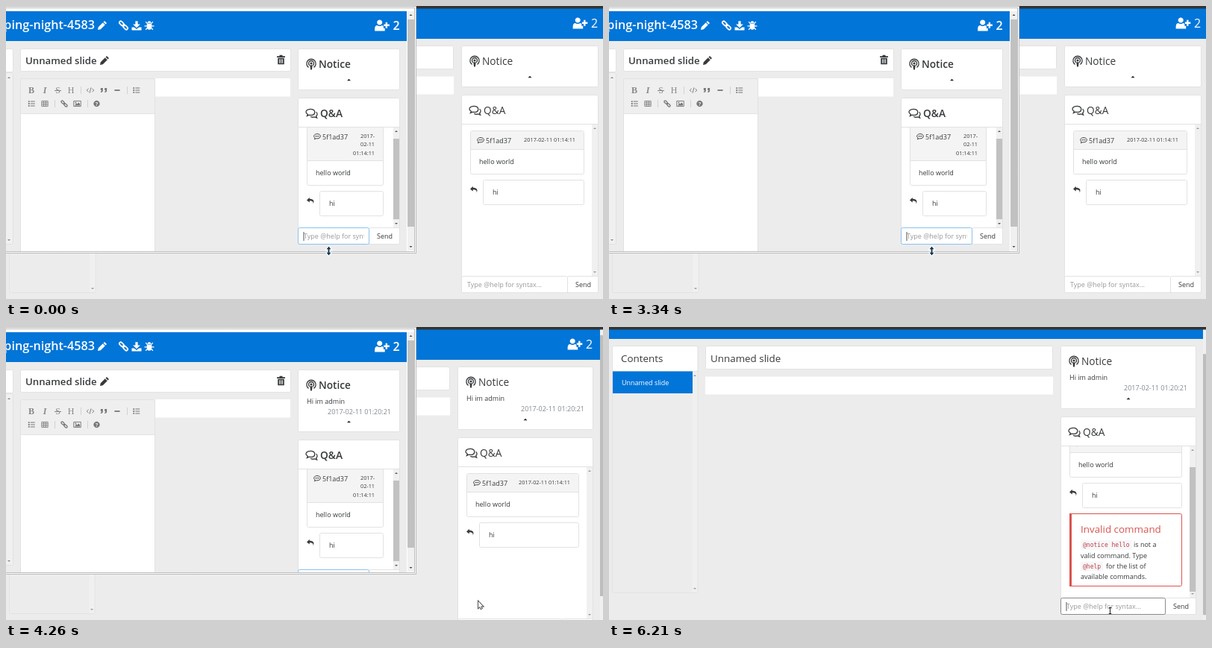
Animation of 800 by 393 pixels, one loop 6.61 s. Source, as an HTML page with a canvas:

```html
<!DOCTYPE html>
<html lang="en">
<head>
<meta charset="utf-8">
<title>Slide chat commands</title>
<style>
  html, body { margin: 0; width: 100%; height: 100%; overflow: hidden; background: #ececec; }
  canvas { display: block; }
</style>
</head>
<body>
<canvas id="stage" width="800" height="393"></canvas>
<script>
const ctx = document.getElementById('stage').getContext('2d');
const LOOP = 6610;
const BLUE = '#0275d8', INK = '#373a3c', GREY = '#ececec', LINE = '#e2e2e2', RED = '#d9534f';
const SANS = '"Open Sans", "Noto Sans", sans-serif';
const MONO = '"DejaVu Sans Mono", monospace';
const USER = '5f1ad37';

// Icons live in a box from -8 to 8: f is filled, s is stroked with width w.
const ICONS = {
  pencil: { f: 'M-8 8l1-5 8-8 4 4-8 8zM2-6l2-2 4 4-2 2z' },
  link: { s: 'M-3-6.2L-.2-3.4A2.2 2.2 0 0 1-3.4-.2L-6.2-3A2.2 2.2 0 0 1-3-6.2zM3 6.2L.2 3.4A2.2 2.2 0 0 1 3.4 .2L6.2 3A2.2 2.2 0 0 1 3 6.2zM-1.5-1.5L1.5 1.5', w: 2.2 },
  download: { f: 'M-2-7h4v5h4L0 4l-6-6h4zM-8 3h4l4 3 4-3h4v5h-16z' },
  bug: { f: 'M-3-4a3 3 0 0 1 6 0zM-4-3h8v5a4 5 0 0 1-8 0z', s: 'M-8 1h16M-6-6l3 3M6-6l-3 3M-6 7l3-3M6 7l-3-3', w: 1.6 },
  userPlus: { f: 'M-3-.5a3.8 3.8 0 1 1 .01 0zM-10 8v-3q0-5 3.5-5 3.5 2 7 0 1.5 0 2 1.5v2.5h2v4zM3-1.5h2.5v-3h2.5v3h3v2.5h-3v3h-2.5v-3h-2.5z' },
  trash: { f: 'M-7-6h14v2h-14zM-2.5-8h5v2h-5zM-5.5-3h11v11h-11zM-3.2-1v7h1.2v-7zM-.6-1v7h1.2v-7zM2-1v7h1.2v-7z' },
  podcast: { s: 'M-4 5a7 7 0 1 1 8 0M-2.5 2a4 4 0 1 1 5 0', f: 'M0-3a1.8 1.8 0 1 1-.01 0zM-2 1.5h4l-1 7h-2z', w: 1.5 },
  comments: { s: 'M-2-6c4 0 6 2 6 4.3s-2 4.3-6 4.3q-1 0-2-.3l-3 1.3 1-2.3c-5-3-2-7.3 4-7.3zM6-2c3 3 1 5 0 6l1 2.5-3-1.3q-4 1-6-.6', w: 1.4 },
  comment: { s: 'M0-5.5c4.5 0 7 2.3 7 5s-2.5 5-7 5q-1 0-2-.2l-4 1.7 1.5-2.7c-5-3.3-2-8.8 4.5-8.8z', f: 'M-4-1.5h2v2h-2zM-1-1.5h2v2h-2zM2-1.5h2v2h-2z', w: 1.5 },
  reply: { f: 'M-8-1l6-6v3.5c8 0 11 4 8 10.5 0-5-2-6.5-8-6.5v3.5z' },
  code: { s: 'M-4-4l-4 4 4 4M4-4l4 4-4 4M1.5-6l-3 12', w: 1.6 },
  quote: { f: 'M-7-5h5v6q0 4-5 4v-2q2 0 2-3h-2zM2-5h5v6q0 4-5 4v-2q2 0 2-3h-2z' },
  minus: { f: 'M-6-1.5h12v3h-12z' },
  list: { s: 'M-2-5h10M-2 0h10M-2 5h10', f: 'M-7-6.5h3v3h-3zM-7-1.5h3v3h-3zM-7 3.5h3v3h-3z', w: 1.8 },
  table: { s: 'M-7-6h14v12h-14zM-7-2h14M-7 2h14M-2.3-6v12M2.3-6v12', w: 1.4 },
  image: { s: 'M-8-6h16v12h-16z', f: 'M-6 4l4-5 2 2 3-4 3 4v3zM-5-4h3v3h-3z', w: 1.6 },
  help: { f: 'M0-7a7 7 0 1 1-.01 0z' },
  up: { f: 'M-8 4L0-4 8 4z' },
  down: { f: 'M-8-4L0 4 8-4z' },
  resize: { f: 'M0-8l4 5h-2.7v6h2.7l-4 5-4-5h2.7v-6h-2.7z' },
  pointer: { f: 'M0 0v14l3.2-3 2.3 5 2-1-2.3-4.7h4.6z' },
  beam: { s: 'M-3-7h6M0-7v14M-3 7h6', w: 1.8 }
};

function icon(name, x, y, size = 13, color = INK, halo) {
  const { f, s, w } = ICONS[name];
  ctx.save();
  ctx.translate(x, y);
  ctx.scale(size / 16, size / 16);
  ctx.fillStyle = color;
  ctx.strokeStyle = halo || color;
  if (halo) { ctx.lineWidth = 3; ctx.stroke(new Path2D(f || s)); }
  if (f) ctx.fill(new Path2D(f));
  ctx.strokeStyle = color;
  if (s) { ctx.lineWidth = w; ctx.stroke(new Path2D(s)); }
  ctx.restore();
}

function rect(x1, y1, x2, y2, color) {
  ctx.fillStyle = color;
  ctx.fillRect(x1, y1, x2 - x1, y2 - y1);
}

function box(x1, y1, x2, y2, fill = '#fff', stroke = LINE, radius = 2) {
  ctx.beginPath();
  ctx.roundRect(x1 + .5, y1 + .5, x2 - x1 - 1, y2 - y1 - 1, radius);
  ctx.fillStyle = fill;
  ctx.fill();
  ctx.strokeStyle = stroke;
  ctx.lineWidth = 1;
  ctx.stroke();
}

function text(str, x, y, size = 9, { color = INK, weight = 400, align = 'left', family = SANS } = {}) {
  ctx.font = `${weight} ${size}px ${family}`;
  ctx.textAlign = align;
  ctx.fillStyle = color;
  ctx.fillText(str, x, y);
}

function clipped(x1, y1, x2, y2, draw) {
  ctx.save();
  ctx.beginPath();
  ctx.rect(x1, y1, x2 - x1, y2 - y1);
  ctx.clip();
  draw();
  ctx.restore();
}

function scrollbar(x1, y1, x2, y2, thumb, arrow = '#999') {
  rect(x1, y1, x2, y2, '#f0f0f0');
  const cx = (x1 + x2) / 2;
  if (thumb) rect(x1, thumb[0], x2, thumb[1], '#c1c1c1');
  icon('up', cx, y1 + 5, 4, arrow);
  icon('down', cx, y2 - 5, 4, arrow);
}

// Latest value of a [time, value, time, value, ...] list.
function at(t, ...steps) {
  let value = steps[1];
  for (let i = 0; i < steps.length && steps[i] <= t; i += 2) value = steps[i + 1];
  return value;
}

function errorCard(x, right, y) {
  box(x + 12, y, right - 19, y + 98, '#fff', RED);
  rect(x + 12, y, x + 15, y + 98, RED);
  text('Invalid command', x + 27, y + 26, 13.4, { color: RED });
  const code = (str, row) => {
    const w = str.length * 4.82;
    rect(x + 27, row - 9, x + 33 + w, row + 4, '#f7f7f9');
    text(str, x + 30, row, 8, { color: '#bd4147', family: MONO });
  };
  code('@notice hello', y + 45);
  text('is not a', x + 98, y + 45);
  text('valid command. Type', x + 27, y + 59.5);
  code('@help', y + 73.5);
  text('for the list of', x + 61, y + 73.5);
  text('available commands.', x + 27, y + 88);
}

function input(col, y) {
  const { x, right, value, focus, clear } = col;
  const edge = right - 41;
  box(edge - 1, y, right, y + 23);
  text('Send', right - 20.5, y + 15, 9, { align: 'center' });
  box(x, y, edge, y + 23, '#fff', focus || LINE);
  clipped(x + 5, y, edge - 7, y + 23, () => {
    ctx.font = `400 9px ${SANS}`;
    const width = ctx.measureText(value).width;
    const start = x + 8 - Math.max(0, width - (edge - x - 17));
    if (value) text(value, start, y + 15, 9, { color: '#55595c' });
    else text('Type @help for syntax...', x + 8, y + 15, 9, { color: '#999' });
    if (focus) rect(start + width - .5, y + 6, start + width + .5, y + 18, '#555');
  });
  if (clear) text('×', edge - 14, y + 15.5, 12, { color: '#5b9fd6', align: 'center' });
}

// Draws the notice and chat panels; returns the top of the input row.
function chatColumn(col) {
  const { x, right, top, weight, grow, tint, posted, narrow, scroll = 0 } = col;
  const extra = posted ? grow : 0;
  box(x, top, right, top + 56 + extra, '#fff');
  ctx.globalAlpha = tint;
  box(x, top, right, top + 56 + extra, '#c4e6ff', '#b5daf5');
  ctx.globalAlpha = 1;
  icon('podcast', x + 18, top + 21, 14);
  text('Notice', x + 28, top + 26, 13.7, { weight });
  if (posted) {
    text('Hi im admin', x + 12, top + 46);
    text('2017-02-11 01:20:21', right - 12, top + 60, 9, { color: '#818a91', align: 'right' });
  }
  icon('up', (x + right) / 2, top + 42 + extra, 5, '#222');

  const q = top + 66 + extra;
  const inputTop = q + (narrow ? 174 : 243);
  box(x, q, right, inputTop + 23);
  icon('comments', x + 19, q + 21, 15);
  text('Q&A', x + 30, q + 25.5, 13.7, { weight });
  rect(x, q + 39, right, q + 40, LINE);

  const edge = right - (narrow ? 22 : 19);
  const m = q + (narrow ? 84 : 73) - scroll;
  clipped(x + 1, q + 40, right - 1, inputTop, () => {
    const headTop = narrow ? q + 30 : m - 25;
    const headMid = m - (narrow ? 32 : 12);
    box(x + 12, headTop, edge, m + 34);
    rect(x + 13, headTop + 1, edge - 1, m, '#f4f4f4');
    rect(x + 13, m, edge - 1, m + 1, LINE);
    icon('comment', x + 26, headMid, 10);
    text(USER, x + 33, headMid + 3.5);
    const lines = narrow ? ['2017-', '02-11', '01:14:11'] : ['2017-02-11 01:14:11'];
    lines.forEach((s, i) => text(s, edge - 12, headMid + 2 + i * 11.3, 7.3, { align: 'right' }));
    text('hello world', x + 24, m + 20);
    icon('reply', x + 17, m + 54, 10);
    box(x + 29, m + 41, edge, m + 75);
    text('hi', x + 42, m + 61);
    if (scroll) errorCard(x, right, m + 82);
    const thumb = narrow ? [q + 55, q + 163] : scroll ? [q + 68, inputTop - 8] : null;
    scrollbar(right - 9, q + 40, right - 1, inputTop, thumb, narrow ? '#555' : '#999');
  });
  input(col, inputTop);
  return inputTop;
}

function popup(x, bottom, width, rows, highlighted) {
  const rowHeight = 16.5, top = Math.round(bottom - rows.length * rowHeight - 2);
  box(x, top, x + width, bottom, '#fff', '#b4b4b4', 0);
  if (highlighted) rect(x + 1, top + 1, x + width - 1, bottom - 1, '#e6e6e6');
  rows.forEach((s, i) => text(s, x + 5, top + 12.5 + i * rowHeight, 9, { color: '#222' }));
}

function audiencePage(t, posted, tint) {
  const scrolled = t >= 4600, dy = scrolled ? -28 : 0;
  const shift = posted ? 5 : 0;
  rect(0, 0, 800, 393, GREY);
  rect(0, 3, 800, 44 + dy, BLUE);
  if (!scrolled) {
    const x = posted ? 7 : 0;
    icon('userPlus', 769 - x, 23, 15, '#fff');
    text('2', 784 - x, 28.5, 16, { color: '#fff' });
  }
  const side = posted ? 119.5 : 120.5;
  box(4, 53 + dy, side, 385 + dy, GREY);
  box(4, 53 + dy, side, 88 + dy);
  text('Contents', 16, 75 + dy, 13.4);
  scrollbar(side - 8, 88 + dy, side - 1, 384 + dy);
  rect(5, 87.5 + dy, side - 7.5, 117 + dy, BLUE);
  text('Unnamed slide', 17, 106 + dy, 9, { color: '#fff' });
  box(129, 53 + dy, 600 - shift, 85 + dy);
  text('Unnamed slide', 136, 75 + dy, 13.4);
  rect(129, 94.5 + dy, 600 - shift, 118.5 + dy, '#fff');

  const value = at(t, 0, '', 4600, '@', 4820, '@n', 4970, '@noti', 5290, '@notic',
    5360, '@notice ', 5680, '@notice h', 5830, '@notice he', 5910, '@notice hello', 6140, '');
  const inputTop = chatColumn({
    x: 610 - shift, right: posted ? 787 : 794, top: 53 + dy, weight: 400, grow: 29,
    posted, tint, value, focus: scrolled && '#8a8a8a', clear: value, scroll: t >= 6140 ? 25 : 0
  });
  if (t >= 4670 && t < 4820) popup(605, inputTop, 172, ['@help', '@feedback <description>']);
  if (posted) {
    rect(796, 3, 800, 393, '#f0f0f0');
    rect(796, 11 - dy * .9, 800, 361 - dy * .9, '#bdbdbd');
  }
  rect(0, 0, 800, 3.5, '#333');
}

function adminToolbar() {
  const grey = '#888';
  const serif = (str, x, style = '') =>
    text(str, x, 117, 12, { color: grey, align: 'center', weight: style, family: '"Liberation Serif", serif' });
  serif('B', 34, 'bold');
  serif('I', 52, 'italic bold');
  serif('S', 69.5);
  rect(65, 113, 74, 114, grey);
  serif('H', 87);
  for (const [name, x, y] of [['code', 113, 113], ['quote', 131, 113], ['minus', 149, 113],
    ['list', 174.5, 113], ['list', 34, 131], ['table', 52, 131], ['link', 78, 131],
    ['image', 95.5, 131], ['help', 121.5, 131]]) icon(name, x, y, 9.5, '#777');
  text('?', 121.5, 134, 7.5, { color: '#eee', weight: 700, align: 'center' });
  for (const [x, y] of [[100, 108], [162, 108], [65, 126], [109, 126]]) rect(x, y, x + 1, y + 10, '#d2d2d2');
}

function adminWindow(t, posted, tint) {
  clipped(0, 0, 550, 332, () => {
    rect(0, 0, 550, 332, '#fff');
    rect(0, 7, 537, 330, GREY);
    rect(0, 7, 537, 47, BLUE);
    text('ping-night-4583', 119, 31, 16.2, { color: '#fff', weight: 600, align: 'right' });
    icon('pencil', 129, 26, 12, '#fff');
    icon('link', 157.5, 26, 13, '#fff');
    icon('download', 175, 26, 13, '#fff');
    icon('bug', 192, 26, 13, '#fff');
    icon('userPlus', 503.5, 26, 15, '#fff');
    text('2', 518.5, 31.5, 16, { color: '#fff', weight: 600 });

    box(-5, 57, 10, 89);
    box(-5, 89, 10, 320, '#f0f0f0');
    icon('up', 4, 96, 4, '#888');
    icon('down', 4, 314, 4, '#888');
    box(19, 57, 382, 88);
    text('Unnamed slide', 26, 77.5, 13.2, { weight: 600 });
    icon('pencil', 132, 73, 12);
    icon('trash', 368.5, 72, 12.5);
    rect(200, 97, 381, 121.5, '#fff');
    box(19, 97, 200, 335);
    box(19, 97, 200, 145, '#efefef');
    adminToolbar();

    const value = at(t, 0, '', 150, '@', 610, '@n', 700, '@no', 780, '@not', 990, '@notice ',
      1920, '@notice H', 2150, '@notice Hi', 2220, '@notice Hi ', 2520, '@notice Hi i',
      2600, '@notice Hi im', 2690, '@notice Hi im ', 2880, '@notice Hi im a',
      3030, '@notice Hi im ad', 3110, '@notice Hi im adm', 3180, '@notice Hi im admi',
      3260, '@notice Hi im admin', 3340, '');
    chatColumn({ x: 391, right: 528, top: 57, weight: 600, grow: 28, narrow: true,
      posted, tint, value, focus: '#8cc2ee' });

    const list = at(t, 0, '', 220, 'all', 610, 'one', 990, 'chosen', 1520, '', 1920, 'one',
      2150, '', 2370, 'one', 2520, '', 2780, 'one', 3110, '');
    const notice = '@notice <description>';
    if (list === 'all') {
      popup(391, 297, 147, ['@help', notice, '@clear', '@next', '@previous', '@background <color> <opacity>']);
    } else if (list) popup(391, 297, 110, [notice], list === 'chosen');

    scrollbar(538, 7, 547, 328, [18, 296], '#444');
    rect(0, 329, 550, 332, '#fff');
    ctx.strokeStyle = '#777';
    ctx.lineWidth = 1;
    ctx.setLineDash([1, 1]);
    ctx.strokeRect(-5.5, 2.5, 553, 327);
    ctx.strokeRect(-5.5, .5, 555, 331);
    ctx.setLineDash([]);
  });
}

function cursor(t) {
  if (t >= 4600) return icon('beam', 671.5, 380.5, 9, '#222');
  if (t < 4050) {
    const [x, y] = at(t, 0, [432.5, 328.5], 3890, [434, 329], 3980, [436.5, 330.5]);
    return icon('resize', x, y, 12, '#17364f', '#fff');
  }
  const [x, y] = at(t, 4050, [490, 343], 4120, [560, 358], 4190, [612, 369], 4260, [633, 368],
    4350, [650, 372], 4430, [668, 376]);
  icon('pointer', x, y, 10, '#fff', '#444');
}

function draw() {
  const t = performance.now() % LOOP;
  const posted = t >= 3480;
  const tint = at(t, 0, 0, 3480, .35, 3560, .75, 3640, 1, 4050, .75, 4120, .45, 4190, .2, 4260, 0);
  audiencePage(t, posted, tint);
  if (t < 4600) adminWindow(t, posted, tint);
  cursor(t);
  requestAnimationFrame(draw);
}
draw();
</script>
</body>
</html>
```
